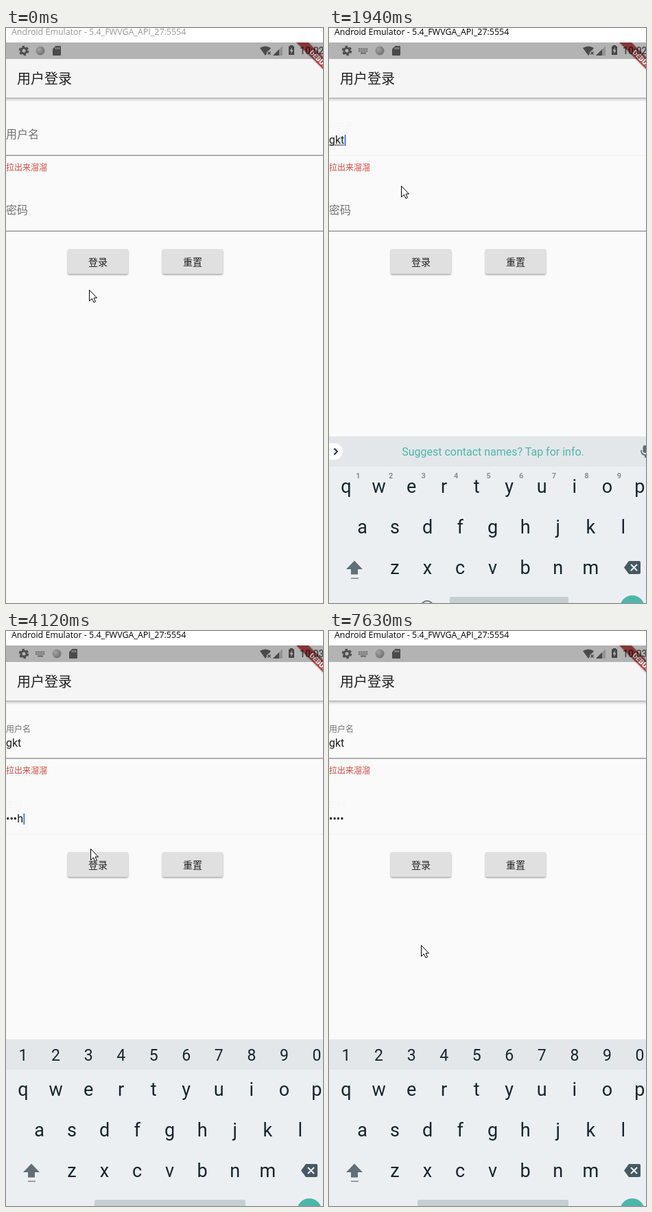
These frames come from a looping animation (462 by 835 pixels, 8 s). An HTML page:

```html
<!DOCTYPE html>
<html lang="zh-CN">
<head>
<meta charset="utf-8">
<title>用户登录</title>
<style>
  html, body { margin: 0; width: 100%; height: 100%; overflow: hidden; background: #fafafa; }
  svg { display: block; }
  text { font-family: Roboto, "Noto Sans CJK SC", "Noto Sans CJK", sans-serif; white-space: pre; }
  .cap { font-family: "Open Sans", sans-serif; font-size: 12.45px; }
  .mid { text-anchor: middle; }
</style>
</head>
<body>
<svg id="stage" width="462" height="835" viewBox="0 0 462 835">
  <defs>
    <radialGradient id="ball" cx=".35" cy=".35" r=".75">
      <stop offset="0" stop-color="#a2a2a2"/><stop offset="1" stop-color="#6c6c6c"/>
    </radialGradient>
    <linearGradient id="fall" x2="0" y2="1">
      <stop offset="0" stop-opacity=".3"/><stop offset=".4" stop-opacity=".13"/><stop offset="1" stop-opacity="0"/>
    </linearGradient>
    <filter id="soft" x="-20%" y="-40%" width="140%" height="180%"><feGaussianBlur stdDeviation="1.3"/></filter>
    <clipPath id="fieldClip"><rect y="121" width="462" height="63"/></clipPath>
  </defs>
  <rect width="462" height="835" fill="#fafafa"/>
  <g id="form"></g>

  <rect y="101" width="462" height="6" fill="url(#fall)"/>
  <rect y="21" width="462" height="80" fill="#f5f5f5"/>
  <text x="16" y="80.5" font-size="20" fill="#212121">用户登录</text>
  <g transform="translate(456 45) rotate(45)">
    <rect x="-40" y="-6" width="80" height="12" opacity=".5" filter="url(#soft)"/>
    <rect x="-40" y="-6" width="80" height="12" fill="#b9494a"/>
    <text class="mid" y="3.7" font-size="10.2" font-weight="900" fill="#fff">DEBUG</text>
  </g>
  <rect y="21" width="462" height="24" fill-opacity=".27"/>

  <g fill="none" stroke="#4f4f4f">
    <circle cx="26" cy="33" r="4" stroke-width="3"/>
    <circle cx="26" cy="33" r="6" stroke-width="2.6" stroke-dasharray="3.4 2.88"/>
  </g>
  <g id="imeIcon" stroke="#636363" stroke-width="2" stroke-dasharray="2 .8">
    <path d="M43 30.5h14M43 33.5h14"/><path d="M46 36.5h8" stroke-dasharray="none"/>
  </g>
  <g id="notices">
    <circle cx="50" cy="33" r="6.5" fill="url(#ball)"/>
    <path d="M72.500 26H79q1 0 1 1V39q0 1-1 1H69q-1 0-1-1V30.500z" fill="#4a4a4a"/>
    <path d="M72.500 28v3M75 28v3M77.500 28v3" stroke="#a5a5a5" stroke-width="1.2"/>
  </g>
  <path d="M370 29q8-5 16 0l-8 11z" fill="#4a4a4a"/>
  <path d="M381 34l5 5m0-5l-5 5" stroke="#b3b3b3" stroke-width="4"/>
  <path d="M381.500 34.500l4 4m0-4l-4 4" stroke="#4a4a4a" stroke-width="1.5"/>
  <path d="M403 26v14h-14z" fill="#929292"/><path d="M398 31v9h-9z" fill="#4a4a4a"/>
  <path d="M414 25h4v1.500h2V39h-8V26.500h2z" fill="#444"/>
  <path d="M417 28l-3.500 5.500h2V37.500l3-5.500h-2z" fill="#b3b3b3"/>
  <text id="clock" x="428" y="38" font-size="14" font-weight="500" fill="#000" fill-opacity=".62"></text>

  <rect width="462" height="21" fill="#fff"/>
  <text id="caption" class="cap" x="8" y="10">Android Emulator - 5.4_FWVGA_API_27:5554</text>
  <g id="ime"></g>
  <path id="mouse" d="M.5.5V16.500L4.300 13 7 18.500 9.500 17.300 7 12H11.500z" fill="#fff" stroke="#000" stroke-width="1"/>
</svg>
<script>
const LOOP = 8000;
const USER = "gkt", PASS = "keuh";
const NS = "http://www.w3.org/2000/svg";
const $ = id => document.getElementById(id);

function el(parent, tag, attrs = {}, text) {
  const node = document.createElementNS(NS, tag);
  set(node, attrs);
  if (text !== undefined) node.textContent = text;
  return parent.appendChild(node);
}
function set(node, attrs) {
  for (const k in attrs) node.setAttribute(k, attrs[k]);
}
function write(node, text) {
  if (node.textContent !== text) node.textContent = text;
}
const clamp = v => Math.max(0, Math.min(1, v));
const ramp = (t, start, ms) => clamp((t - start) / ms);
const mix = (a, b, p) => a + (b - a) * p;
const grey = v => `rgb(${v},${v},${v})`;
const show = (node, on) => node.setAttribute("visibility", on ? "visible" : "hidden");

const ticks = [0];
for (const [a, b, n] of [
  [70, 370, 6], [600, 600, 1], [770, 1540, 11], [1620, 1770, 3], [1940, 2570, 9],
  [2730, 2880, 3], [3050, 3350, 5], [3510, 3890, 6], [4050, 4280, 4], [4580, 4670, 2],
  [4900, 5380, 7], [5540, 5920, 6], [6150, 6150, 1], [6550, 6620, 2], [7080, 7080, 1], [7630, 7630, 1]
]) for (let i = 0; i < n; i++) ticks.push(n > 1 ? mix(a, b, i / (n - 1)) : a);

// Pointer path: time, x, y
const path = [
  [0, 121, 380], [250, 42, 112], [370, 54, 167], [924, 54, 167], [1155, 67, 166],
  [1540, 67, 166], [1770, 105, 229], [1940, 105, 229], [2570, 70, 280], [2730, 70, 280],
  [2880, 68, 279], [3510, 68, 279], [3890, 111, 294], [4280, 131, 331], [4580, 131, 340],
  [4670, 131, 342], [4900, 133, 342], [5380, 133, 342], [5920, 143, 457], [6150, 143, 459],
  [6620, 134, 456], [LOOP, 134, 456]
];
function pointer(t) {
  const i = Math.max(1, path.findIndex(p => p[0] >= t));
  const [a, b] = [path[i - 1], path[i]];
  const p = ramp(t, a[0], b[0] - a[0]);
  return [mix(a[1], b[1], p), mix(a[2], b[2], p)];
}

const caretOff = [[2260, 2730], [4200, 4650], [5620, 6150], [6600, 7080], [7630, LOOP + 1]];

function makeField(dy, label, hint) {
  const g = el($("form"), "g", { transform: `translate(0 ${dy})` });
  const clip = el(g, "g", { "clip-path": "url(#fieldClip)" });
  return {
    dy,
    splash: el(clip, "circle", { fill: "#c8c8c8" }),
    line: el(g, "rect", { y: 184, width: 462, height: 2 }),
    label: el(g, "text", {}, label),
    hint: el(g, "text", { y: 168.5, "font-size": 16, fill: "#757575" }, hint),
    value: el(g, "text", { y: 168, "font-size": 16, fill: "#212121" }),
    compose: el(g, "rect", { y: 169.5, height: 1, fill: "#333" }),
    caret: el(g, "rect", { y: 155, width: 2, height: 16, fill: "#4285f4" })
  };
}
function drawField(f, t, s) {
  const tapped = s.focus + 15;
  const r = t < tapped ? (t - tapped + 80) * .41 : 33 + t - tapped;
  set(f.splash, {
    cx: s.tap[0], cy: s.tap[1] - f.dy, r: Math.max(0, r),
    opacity: .4 * (1 - ramp(t, tapped, 200))
  });
  const up = ramp(t, s.focus, 200);
  const lit = t < s.blur ? up : 1 - ramp(t, s.blur, 120);
  set(f.label, { y: 160 - 13.5 * up, "font-size": 16 - 4 * up, fill: grey(mix(115, 245, lit)) });
  const lineLit = t < s.blur ? ramp(t, s.focus + 100, 120) : 0;
  f.line.setAttribute("fill", grey(mix(176, 245, lineLit)));
  f.hint.setAttribute("opacity", s.text ? 0 : up);
  write(f.value, s.text);
  const w = s.text ? f.value.getComputedTextLength() : 0;
  const active = t >= s.focus && t < s.blur;
  f.compose.setAttribute("width", s.compose && active ? w : 0);
  f.caret.setAttribute("x", w && w + .3);
  show(f.caret, active && !caretOff.some(([a, b]) => t >= a && t < b));
}

const user = makeField(0, "用户名", "请输入用户名");
const pass = makeField(110, "密码", "请输入密码");
el($("form"), "text", { y: 206.500, "font-size": 12, fill: "#d0493f" }, "拉出来溜溜");

function makeButton(x, text) {
  const box = { x, width: 88, height: 36, rx: 2 };
  const shade = el($("form"), "rect", { ...box, y: 322.5, filter: "url(#soft)", opacity: .35 });
  const face = el($("form"), "rect", { ...box, y: 321, fill: "#e0e0e0" });
  el($("form"), "text", { class: "mid", x: x + 44, y: 345, "font-size": 14, "font-weight": 500, fill: "#212121" }, text);
  return { shade, face };
}
const login = makeButton(90, "登录");
makeButton(228, "重置");

// On-screen keyboard
const ime = $("ime");
el(ime, "rect", { y: 593, width: 462, height: 260, fill: "#eceff1" });
el(ime, "rect", { y: 593, width: 462, height: 44, fill: "#e3e7e9" });
const suggest = el(ime, "g");
const digits = el(ime, "g");
el(suggest, "rect", { x: -20, y: 603, width: 40, height: 24, rx: 12, fill: "#fff" });
el(suggest, "path", { d: "M7.500 610.500l4.500 4.500-4.500 4.500", fill: "none", stroke: "#263238", "stroke-width": 2 });
el(suggest, "text", { class: "mid", x: 239, y: 621, "font-size": 16, fill: "#4db6ac" }, "Suggest contact names? Tap for info.");
el(suggest, "rect", { x: 457.5, y: 606, width: 6, height: 11, rx: 3, fill: "#546e7a" });
el(suggest, "path", { d: "M455 613q0 7 6 7v4", fill: "none", stroke: "#546e7a", "stroke-width": 1.8 });

const keys = [];
["qwertyuiop", "asdfghjkl", "zxcvbnm"].forEach((row, r) => {
  [...row].forEach((ch, i) => {
    const x = [25, 48.5, 96][r] + i * 47.55;
    const node = el(ime, "text", { class: "mid", x, y: 675 + 59 * r, "font-size": 27, fill: "#15262d" }, ch);
    keys.push({ node, ch });
    if (r) return;
    const n = String((i + 1) % 10);
    el(digits, "text", { class: "mid", x, y: 624, "font-size": 23, fill: "#15262d" }, n);
    if (i < 9) el(suggest, "text", { class: "mid", x: x + 17.5, y: 654, "font-size": 11, "font-weight": 700, fill: "#849095" }, n);
  });
});
const shift = el(ime, "path", { d: "M37 773.500l12 12.500h-7v7.500h-10V786h-7zM32 798.500h11v1.300h-11z" });
el(ime, "path", { d: "M437 774h15q2 0 2 2v15q0 2-2 2h-15l-7-9.500z", fill: "#455a64" });
el(ime, "path", { d: "M440 779l9 9m0-9l-9 9", stroke: "#eceff1", "stroke-width": 2 });
el(suggest, "circle", { cx: 143, cy: 841, r: 9, fill: "none", stroke: "#607d8b", "stroke-width": 2 });
const space = el(ime, "rect", { y: 826, height: 30, rx: 2, fill: "#c7ced1" });
el(ime, "circle", { cx: 442, cy: 842, r: 18, fill: "#4db6ac" });

function drawIme(t) {
  const rest = 1 - ramp(t, 1170, 160);
  const numeric = t >= 3120, upper = t < 1465;
  set(ime, { transform: `translate(0 ${24 * rest * rest})`, opacity: 1 - rest ** 4 });
  show(ime, t > 1170);
  suggest.setAttribute("display", numeric ? "none" : "inline");
  digits.setAttribute("display", numeric ? "inline" : "none");
  for (const k of keys) write(k.node, upper ? k.ch.toUpperCase() : k.ch);
  shift.setAttribute("fill", upper ? "#4db6ac" : "#607078");
  const left = numeric ? 129 : 176;
  set(space, { x: left, width: 349 - left });
}

function passText(t) {
  const n = [3510, 3630, 3760, 3885].filter(k => t >= k).length;
  if (!n) return "";
  return t < 4970 ? "•".repeat(n - 1) + PASS[n - 1] : "•".repeat(n);
}

function draw(t) {
  const typed = [1465, 1620, 1690].filter(k => t >= k).length;
  drawField(user, t, { focus: 830, blur: 3120, tap: [54, 167], text: USER.slice(0, typed), compose: true });
  drawField(pass, t, { focus: 3120, blur: LOOP + 1, tap: [68, 279], text: passText(t) });
  drawIme(t);

  const press = Math.min(ramp(t, 4960, 120), 1 - ramp(t, 5200, 180));
  login.face.setAttribute("fill", grey(mix(224, 214, press)));
  set(login.shade, { y: 322.5 + 1.5 * press, opacity: .35 + .1 * press });

  const slide = ramp(t, 1170, 125);
  $("imeIcon").setAttribute("opacity", clamp(slide * 2 - 1));
  $("notices").setAttribute("transform", `translate(${24 * slide} 0)`);
  write($("clock"), t < 2800 ? "10:02" : "10:03");
  $("caption").setAttribute("fill", t < 600 ? "#999" : "#000");
  const [x, y] = pointer(t);
  $("mouse").setAttribute("transform", `translate(${Math.round(x)} ${Math.round(y)})`);
}

const began = performance.now();
function frame() {
  const t = (performance.now() - began) % LOOP;
  draw(ticks.findLast(k => k <= t + 10));
  requestAnimationFrame(frame);
}
frame();
</script>
</body>
</html>
```
